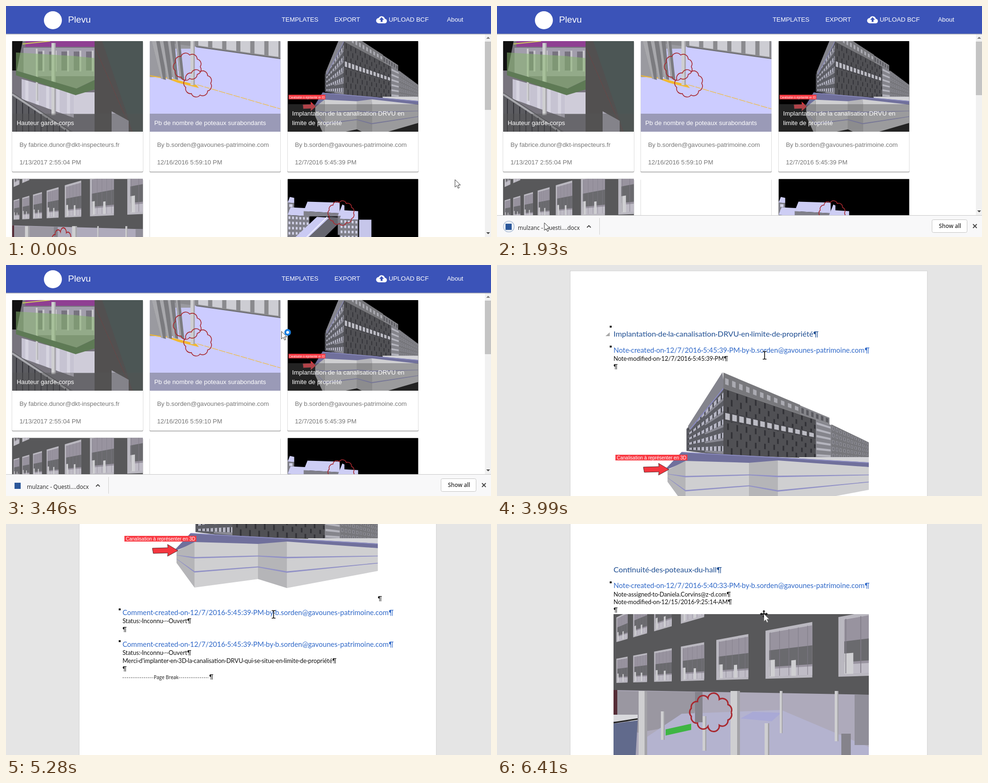
An HTML page that plays this animation: 1024x487 px, repeating every 6480 ms.

```html
<!DOCTYPE html>
<html lang="en">
<head>
<meta charset="utf-8">
<title>Export demo</title>
<style>
html, body { margin: 0; width: 100%; height: 100%; overflow: hidden; background: #fff; }
svg { display: block; }
#stage { width: 100vw; height: 100vh; }
text { white-space: pre; }
.ui { font-family: "Liberation Sans", Arial, sans-serif; font-size: 13.23px; }
.doc { font-family: Lato, Carlito, sans-serif; }
.bar { font-family: "Open Sans", "Noto Sans", sans-serif; font-size: 11.8px; }
</style>
</head>
<body>
<svg id="stage" viewBox="0 0 1024 487" preserveAspectRatio="none" xmlns="http://www.w3.org/2000/svg"></svg>
<script>
const LOOP = 6480;

// ---------- drawing helpers ----------
const poly = (pts, fill, more = '') => `<polygon points="${pts}" fill="${fill}" ${more}/>`;
const rect = (x, y, w, h, fill, more = '') =>
  `<rect x="${x}" y="${y}" width="${w}" height="${h}" fill="${fill}" ${more}/>`;
const line = (pts, stroke, w = 1, more = '') =>
  `<polyline points="${pts}" fill="none" stroke="${stroke}" stroke-width="${w}" ${more}/>`;
const text = (x, y, s, fill, more = '') => `<text x="${x}" y="${y}" fill="${fill}" ${more}>${s}</text>`;
const group = (id, body, more = '') => `<g id="${id}" ${more}>${body}</g>`;
const frame = (x, y, w, h, body, view = `0 0 ${w} ${h}`) =>
  `<svg x="${x}" y="${y}" width="${w}" height="${h}" viewBox="${view}" overflow="hidden">${body}</svg>`;
const repeat = (n, draw) => Array.from({ length: n }, (_, i) => draw(i)).join('');
const ramp = (x0, y0, slope) => x => y0 + (x - x0) * slope;
const mix = (a, b, k) => a + (b - a) * k;

// A wall between two x positions; top and foot are functions of x
const wall = (x0, x1, top, foot) => ({ x0, x1, top, foot });
function cell(q, u0, v0, u1, v1, fill) {
  const at = (u, v) => {
    const x = mix(q.x0, q.x1, u);
    return x.toFixed(1) + ',' + mix(q.top(x), q.foot(x), v).toFixed(1);
  };
  return poly([at(u0, v0), at(u1, v0), at(u1, v1), at(u0, v1)].join(' '), fill);
}
const fillWall = (q, fill) => cell(q, 0, 0, 1, 1, fill);
const grid = (q, cols, rows, w, h, fill, stagger = 0) => repeat(rows, r => repeat(cols, c => {
  const u = (c + .5 - w / 2 + r % 2 * stagger) / cols, v = (r + .5 - h / 2) / rows;
  return cell(q, u, v, u + w / cols, v + h / rows, fill);
}));
const pillar = (x, y, w, h) => rect(x, y, w, h, '#cfcfd1') + rect(x + w * .7, y, w * .3, h, '#a3a2a7');

function cloud(cx, cy, rx, ry, n, w) {
  const at = i => [cx + rx * Math.cos(i / n * 2 * Math.PI), cy + ry * Math.sin(i / n * 2 * Math.PI)];
  const r = (rx + ry) / n * 1.8;
  return `<path d="M${at(0)}${repeat(n, i => `A${r} ${r} 0 0 1 ${at(i + 1)}`)}" fill="none" stroke="#a8282f" stroke-width="${w}"/>`;
}

// ---------- pictures ----------
function building() {
  const roof = ramp(478, 260, .34), foot = ramp(478, 401, .035), eave = ramp(476, 226, .42);
  const side = wall(400, 478, ramp(478, 260, -1.1), ramp(400, 392, .12));
  const front = wall(478, 673, roof, foot), bend = wall(673, 706, roof, foot), wing = wall(706, 785, ramp(706, 336, .48), foot);
  const attic = wall(478, 640, eave, roof), step = wall(640, 702, ramp(640, 296, .42), roof);
  let s = fillWall(side, '#5c5d64');
  s += repeat(5, i => cell(side, .05, i / 5 + .06, 1, i / 5 + .14, '#b4b4c2') + cell(side, .5, i / 5 + .14, 1, i / 5 + .18, '#8a8a94'));
  s += grid(side, 9, 5, .3, .4, '#3f4047');
  s += poly('403,340 476,226 480,258 408,348', '#84848d') + line('408,346 480,258', '#8a8ac0', 2);
  s += fillWall(attic, '#78787c') + grid(attic, 11, 1, .5, .4, '#aaaab1') + fillWall(step, '#85858a') + grid(step, 6, 1, .5, .6, '#5a5a60');
  s += fillWall(front, '#505054') + grid(front, 10, 8, .18, .8, '#323237', .4);
  s += cell(front, 0, .34, 1, .48, '#47474c') + repeat(13, i => cell(front, .02 + i / 13.2, .36, .07 + i / 13.2, .46, '#bcbcc4'));
  s += fillWall(bend, '#85858c') + grid(bend, 1, 6, .9, .35, '#b4b4bd');
  s += fillWall(wing, '#77777c') + grid(wing, 10, 5, .5, .55, '#a4a4ad') + grid(wing, 10, 5, .2, .45, '#505056');
  // stone base: four faces folding along x
  const xs = [360, 398, 532, 593, 785], tops = [432, 413, 417, 412, 426], feet = [457, 509, 491, 510, 474];
  s += rect(638, 405, 147, 14, '#d4d4d8') + poly('390,394 785,416 785,426 400,414 352,434', '#70709c') + line('390,395 785,417', '#8f8fc4', 1.5);
  s += repeat(4, i => {
    const slope = ys => ramp(xs[i], ys[i], (ys[i + 1] - ys[i]) / (xs[i + 1] - xs[i]));
    const face = wall(xs[i], xs[i + 1], slope(tops), slope(feet));
    return fillWall(face, i % 2 ? '#cfcfd1' : '#b5b5b8') + cell(face, 0, .33, 1, .36, '#9090c6') + cell(face, 0, .64, 1, .67, '#9090c6');
  });
  s += rect(250, 400, 152, 12, '#f93a43') + text(253, 409.6, 'Canalisation à représenter en 3D', '#fff', 'class="ui" style="font-size:10px"');
  return s + poly('309,426 342,425 341,418 363,431 341,443 342,436 311,437', '#f5363f', 'stroke="#5c2a2e"');
}

function hall() {
  const along = i => 252 + 325 * i / (10.16 - i);
  const bay = (i, top, foot) => wall(along(i), along(i + .69), top, foot);
  const glass = q => fillWall(q, '#bab8c0') + cell(q, .08, .06, 1, .96, '#98939f') + cell(q, .08, .42, 1, .76, '#6a6a6e') +
    cell(q, .08, .8, 1, .96, '#bfbcc6') + cell(q, .08, .62, .2, .96, '#cfcfd2') + cell(q, .55, .66, .65, .96, '#cfcfd2') +
    grid(q, 5, 1, .05, .9, '#807c88');
  let s = rect(246, 190, 539, 312, '#58585a');
  s += repeat(4, i => glass(bay(i, ramp(252, 197, -.5), ramp(252, 249, -.285))));
  s += repeat(7, i => glass(bay(i, ramp(252, 284, -.187), ramp(252, 335, -.028))));
  s += poly('246,350 785,360 785,502 246,502', '#aeaabb') + poly('254,352 430,354 410,420 297,440 254,402', '#9a97a1');
  s += poly('390,400 600,392 785,470 785,502 300,502 300,460', '#b4b3cf') + poly('514,410 540,396 600,398 580,416', '#a9a9d6');
  s += rect(246, 350, 8, 52, '#552c36') + rect(246, 402, 51, 14, '#d9d9dd') + line('246,419 297,411', '#222', 3);
  s += poly('246,421 297,414 292,502 246,502', '#616a8c') + rect(418, 354, 16, 64, '#85838c');
  s += poly('356,433 410,421 410,434 356,446', '#3fb544') + rect(755, 360, 30, 106, '#908e99') + rect(727, 442, 20, 60, '#85838b');
  s += [[299, 18, 502], [493, 20, 502], [597, 6, 441], [713, 8, 458]].map(([x, w, end]) => pillar(x, 352, w, end - 352)).join('');
  s += pillar(346, 395, 8, 60) + pillar(434, 405, 8, 73) + pillar(565, 420, 10, 80) + cloud(451.5, 397, 43, 30, 11, 3);
  return frame(246, 190, 539, 312, s, '246 190 539 312');
}

function balcony() {
  const rail = wall(8, 136, ramp(8, 24, .06), ramp(8, 62, .3)), turn = wall(136, 174, ramp(136, 32, .1), ramp(136, 100, -.48));
  const low = wall(20, 130, ramp(20, 80, .28), ramp(20, 122, .36));
  let s = rect(0, 0, 276, 191, '#77747d') + poly('0,0 22,0 10,62 0,62', '#111') + rect(28, 0, 146, 12, '#8f3f92');
  s += rect(24, 14, 150, 60, '#a29eac') + repeat(5, i => rect(52 + i * 26, 22, 12, 40, '#77737f') + rect(64 + i * 26, 20, 4, 44, '#c8c6cc'));
  s += fillWall(low, '#c6c3d2') + grid(low, 5, 1, .3, 1, '#d6d4e0') + rect(130, 108, 44, 46, '#cfccd9');
  s += pillar(83, 4, 9, 152) + pillar(50, 16, 5, 110);
  s += `<g opacity=".55">${fillWall(rail, '#87b56e') + fillWall(turn, '#87b56e')}</g>`;
  s += line('22,6 80,0', '#cfc95c', 2) + poly('8,62 136,100 174,82 174,102 134,114 8,72', '#5e7a55');
  s += poly('0,108 128,191 0,191', '#5b5b60') + line('0,112 120,191', '#a9a9ae', 4) + repeat(9, i => rect(8 + i * 13, 122 + i * 8, 2, 80, '#34343a'));
  s += rect(174, 0, 102, 191, '#4c5655') + poly('174,0 190,0 255,191 174,191', '#525050') + line('176,16 253,191', '#6a4646');
  return s + poly('210,148 246,168 246,191 210,191', '#a7a5b1');
}

function posts() {
  const back = wall(0, 276, () => 0, ramp(98, 12, .14)), panes = wall(98, 276, () => 0, ramp(98, 9, .14));
  let s = rect(0, 0, 276, 191, '#ccccff') + rect(0, 0, 92, 76, '#9a9aa0') + rect(54, 16, 40, 66, '#c6c6f2');
  s += fillWall(back, '#8a8a8e') + grid(panes, 6, 1, .7, 1, '#cdcdd3') + line('98,12 276,37', '#6c6c70', 2);
  s += poly('18,72 98,92 104,99 60,88', '#f2b92f') + line('0,73 24,77', '#f2b92f', 2) + line('100,92 276,143', '#efbd48', 1.3, 'stroke-dasharray="14 2"');
  s += repeat(4, i => {
    const x = 4 + i * 17, end = 24 + i * 13, w = 24 - i * 5;
    return poly(`${x},0 ${x + w},0 ${end + 10},82 ${end},79`, '#7b7b7f') + poly(`${x},0 ${x + w * .4},0 ${end + 4},80 ${end},79`, '#a8a8ac');
  });
  return s + pillar(86, 0, 9, 93) + cloud(79.5, 54, 27, 25, 9, 1.6) + cloud(101.5, 89, 27, 25, 9, 1.6);
}

function blocks() {
  const block = (x, y, w, roof, h, cols) => {
    const face = wall(x, x + w, ramp(x, y + roof, .06), () => y + roof + h);
    return poly(`${x},${y + roof} ${x + roof * .4},${y} ${x + w},${y + 2} ${x + w},${y + roof + w * .06}`, '#cdcdf4') +
      fillWall(face, '#80808a') + grid(face, cols, Math.round(h / 11), .5, .5, '#d2d2e8');
  };
  const strip = (x, fill) => poly(`${x},80 ${x + 30},82 ${x - 14},125 ${x - 48},125`, fill);
  return rect(0, 0, 276, 191, '#000') + block(0, 38, 14, 12, 24, 1) + block(0, 60, 46, 16, 55, 6) +
    block(34, 48, 76, 20, 11, 0) + strip(62, '#cacaf3') + strip(90, '#66666f') + line('84,80 38,125', '#f1f1ff', 2) +
    block(106, 54, 14, 24, 40, 0) + block(110, 66, 39, 18, 44, 5) + rect(151, 86, 26, 40, '#c6c6ea') + cloud(113, 72, 26, 22, 11, 1.5);
}

// ---------- web page ----------
function card(x, y, picture, title, by, date) {
  let s = rect(x - .5, y + 1, 277, 276, '#b9b9b9', 'rx="2"') + rect(x, y, 276, 275, '#fff', 'rx="2"');
  if (picture) s += frame(x, y, 276, 191, picture);
  if (!title) return s;
  const h = title.length * 20 + 18;
  s += rect(x, y + 191 - h, 276, h, '#555', 'opacity=".42"');
  title.forEach((row, i) => s += text(x + 9.5, y + 177 - 20 * (title.length - 1 - i), row, '#fff'));
  return s + text(x + 15.5, y + 223, 'By ' + by, '#777') + text(x + 15.5, y + 260, date, '#777');
}

function menu() {
  const item = (y, kind, label) => `<path d="M694,${y}h9l5,5v14h-14zM703,${y}v5h5" fill="#fff" stroke="#111" stroke-width="1.5"/>` +
    rect(691, y + 7.5, 17, 8, '#111') + text(693, y + 13.6, kind, '#fff', 'style="font-size:5.5px;font-weight:bold"') +
    text(713, y + 18.5, label, '#222');
  return rect(674, 46, 120, 108, '#000', 'opacity=".22" rx="2"') + rect(675, 45, 118, 107, '#fff', 'rx="2"') +
    rect(675, 53, 118, 45, '#eee', 'id="hover"') + item(61.5, 'DOC', 'As Text') + item(107, 'XLS', 'As Sheet');
}

function web() {
  const mail = 'b.sorden@gavounes-patrimoine.com';
  const shrink = id => `<use href="#${id}" transform="scale(.512 .8) translate(-246 ${id === 'hall' ? -227.5 : -258.5})"/>`;
  let s = rect(0, 0, 1024, 487, '#fff');
  s += card(13, 74, balcony(), ['Hauteur garde-corps'], 'fabrice.dunor@dkt-inspecteurs.fr', '1/13/2017 2:55:04 PM');
  s += card(303.5, 74, posts(), ['Pb de nombre de poteaux surabondants'], mail, '12/16/2016 5:59:10 PM');
  s += card(594.5, 74, rect(0, 0, 276, 191, '#000') + shrink('building'),
    ['Implantation de la canalisation DRVU en', 'limite de propriété'], mail, '12/7/2016 5:45:39 PM');
  s += card(13, 364.5, shrink('hall')) + card(303.5, 364.5) + card(594.5, 364.5, blocks());
  s += rect(0, 58, 1024, 2, '#b5b5ba') + rect(0, 0, 1024, 58.5, '#3b53b8');
  s += '<circle cx="99" cy="30" r="19" fill="#fff"/>' + text(131, 35, 'Plevu', '#fff', 'style="font-size:19.2px"');
  s += text(582, 33, 'TEMPLATES', '#fff') + text(693.5, 33, 'EXPORT', '#fff') + text(808, 33, 'UPLOAD BCF', '#fff') + text(931, 33, 'About', '#fff');
  s += '<path d="M787,36.5a5.6,5.6 0 0 1 0,-11.2a7,7 0 0 1 13,1.7a4.8,4.8 0 0 1 0,9.5z" fill="#fff"/>' +
    poly('793,23.5 798,29 795,29 795,33.5 791,33.5 791,29 788,29', '#3b53b8');
  s += rect(1011, 60, 13, 427, '#f1f1f1') + poly('1014,69 1018,65 1022,69', '#777');
  s += rect(1011, 75, 13, 144, '#c4c4c4', 'id="thumb"') + poly('1014,477 1022,477 1018,481', '#444', 'id="down"');
  return s + group('menu', menu()) + group('bar', bar(), 'class="bar"');
}

function bar() {
  return rect(0, 441, 1024, 46, '#f8f8f9') + rect(0, 441, 1024, 1, '#c9c9c9') +
    rect(0, 442, 216, 45, '#dfdfdf', 'id="press"') + rect(216, 447, 1, 35, '#cfcfcf') +
    '<circle id="ring" cx="25" cy="465" r="11.5" fill="#edf1f6" stroke="#b4c3d8" stroke-width="1.5"/>' +
    rect(18, 459, 13, 13, '#2b579a', 'id="icon"') + text(44, 471.5, '', '#222', 'id="file"') +
    line('190,467 194,463 198,467', '#444', 1.8) + rect(918.5, 450.5, 74, 27, '#fff', 'rx="3" stroke="#c4c4c4"') +
    text(933, 468, 'Show all', '#333', 'font-weight="600"') + line('1005,460 1013,468', '#444', 1.8) + line('1013,460 1005,468', '#444', 1.8);
}

// ---------- document ----------
const styles = { h1: ['#1f4e92', 16.25], h2: ['#2f68c8', 15], p: ['#111', 12.7] };
function para(kind, y, s, x = 246) {
  const [color, size] = styles[kind];
  return text(x, y, s.replace(/ /g, '·') + '¶', color, `style="font-size:${size}px"`);
}
const bullet = y => rect(238, y, 4, 4, '#000');

function pages() {
  const by = ' PM by b.sorden@gavounes-patrimoine.com', when = '12/7/2016 5:45:39';
  const sheet = y => rect(154.5, y, 754, 1065, '#fff', 'stroke="#c4c4c4" stroke-dasharray="2 1"');
  const dash = (x0, x1) => line(`${x0},699 ${x1},699`, '#555', 1, 'stroke-dasharray="3 1.5"');
  const comment = y => bullet(y - 14) + para('h2', y, `Comment created on ${when}${by}`) + para('p', y + 17, 'Status: Inconnu - Ouvert');
  return sheet(12.5) + sheet(1096.5) +
    bullet(128) + poly('238,142 238,150 229,150', '#a8a8a8') + para('h1', 151, 'Implantation de la canalisation DRVU en limite de propriété') +
    bullet(170) + para('h2', 185, `Note created on ${when}${by}`) + para('p', 202, `Note modified on ${when} PM`) + para('p', 219, '') +
    '<use href="#building"/>' + para('p', 537, '', 785) +
    comment(567) + para('p', 602, '') + comment(634) +
    para('p', 668, "Merci d'implanter en 3D la canalisation DRVU qui se situe en limite de propriété") + para('p', 685, '') +
    dash(246, 311) + text(312, 702, 'Page Break', '#111', 'class="bar" style="font-size:10px"') + dash(364, 428) + para('p', 702, '', 429) +
    `<g transform="translate(0 1133)">` + para('h1', 102, 'Continuité des poteaux du hall') + bullet(121) +
    para('h2', 135, `Note created on 12/7/2016 5:40:33${by}`) + para('p', 153, 'Note assigned to Daniela.Corvins@z-d.com') +
    para('p', 169, 'Note modified on 12/15/2016 9:25:14 AM') + para('p', 186, '') + '<use href="#hall"/></g>';
}

function pointers() {
  const arrow = 'M0,0V16L3.8,12.4L6.4,18.2L9,17.1L6.4,11.4H11.4Z';
  const tips = repeat(4, i => `<path d="M0,-8L3,-5H1V0H-1V-5H-3Z" transform="rotate(${i * 90})"/>`);
  return group('arrow', `<path d="${arrow}" fill="#fff" stroke="#333"/>` +
      '<circle id="busy" cx="13" cy="2" r="5" fill="#fff" stroke="#1a7fe0" stroke-width="4"/>') +
    group('beam', '<path d="M-4,-8H-1L0,-7L1,-8H4M0,-7V7M-4,8H-1L0,7L1,8H4" fill="none" stroke="#111" stroke-width="1.6"/>') +
    group('move', tips + `<path d="${arrow}" fill="#fff" stroke="#666"/>`);
}

const stage = document.getElementById('stage');
stage.innerHTML = `<defs>${group('building', building())}${group('hall', hall())}</defs>` +
  group('web', web(), 'class="ui"') +
  group('doc', rect(0, 0, 1024, 487, '#e5e5e5') + group('pages', pages()), 'class="doc"') + pointers();
const el = {};
stage.querySelectorAll('[id]').forEach(e => el[e.id] = e);

// ---------- motion ----------
// Each leg: start, end, number of steps, then the points passed
const cursorLegs = [
  [80, 600, 8, [722, 24], [730, 74]],
  [1060, 1610, 8, [702, 271]],
  [1710, 1930, 4, [100, 457]],
  [2650, 2880, 4, [313, 367]],
  [2960, 3050, 2, [557, 242]],
  [3140, 3580, 6, [590, 115], [565, 190]]];
const scrollLegs = [
  [4300, 4380, 2, [100]],
  [4670, 5280, 9, [375]],
  [5350, 5980, 9, [1061]],
  [6060, 6410, 5, [1133]]];

// Steps done at time t, as a share from 0 to 1
const steps = (t, a, b, n) =>
  t < a ? 0 : Math.min(n, Math.floor((t - a) / (b - a) * (n - 1) + 1e-6) + 1) / n;

function follow(start, legs, t) {
  let p = start;
  for (const [a, b, n, ...pts] of legs) {
    if (t < a) break;
    const all = [p, ...pts], u = steps(t, a, b, n) * pts.length, i = Math.min(pts.length - 1, Math.floor(u));
    p = all[i].map((v, j) => mix(v, all[i + 1][j], u - i));
  }
  return p;
}

const show = (e, on) => e.setAttribute('display', on ? 'inline' : 'none');
const place = (e, x, y) => e.setAttribute('transform', `translate(${x} ${y})`);
const within = (t, a, b) => t >= a && t < b;

function draw(t) {
  const inDoc = t >= 3990, [x, y] = follow([948, 366], cursorLegs, t), [scroll] = follow([0], scrollLegs, t);
  show(el.web, !inDoc);
  show(el.doc, inDoc);

  const fade = steps(t, 377, 526, 3) - steps(t, 1060, 1217, 3);
  el.menu.setAttribute('opacity', fade);
  show(el.menu, fade > 0);
  show(el.hover, y > 52);

  const barOn = t >= 1530, opening = within(t, 2490, 3400);
  show(el.bar, barOn);
  show(el.press, opening);
  show(el.ring, t < 2410);
  el.icon.setAttribute('opacity', opening ? .3 : 1);
  el.file.setAttribute('fill', opening ? '#555' : '#222');
  el.file.textContent = opening ? 'Opening mulza....docx...' : 'mulzanc - Questi....docx';
  el.thumb.setAttribute('height', barOn ? 113 : 144);
  place(el.down, 0, barOn ? -46 : 0);

  place(el.pages, 0, -scroll);
  const onPicture = inDoc && (within(scroll, 35, 340) || scroll >= 1133);
  show(el.arrow, !inDoc);
  show(el.busy, t >= 2570);
  show(el.beam, inDoc && !onPicture);
  show(el.move, onPicture);
  place(el.arrow, x, y);
  place(el.beam, 565, 190.5);
  place(el.move, 563.5, 189.5);
}

const began = performance.now();
function tick() {
  draw((performance.now() - began) % LOOP);
  requestAnimationFrame(tick);
}
tick();
</script>
</body>
</html>
```
